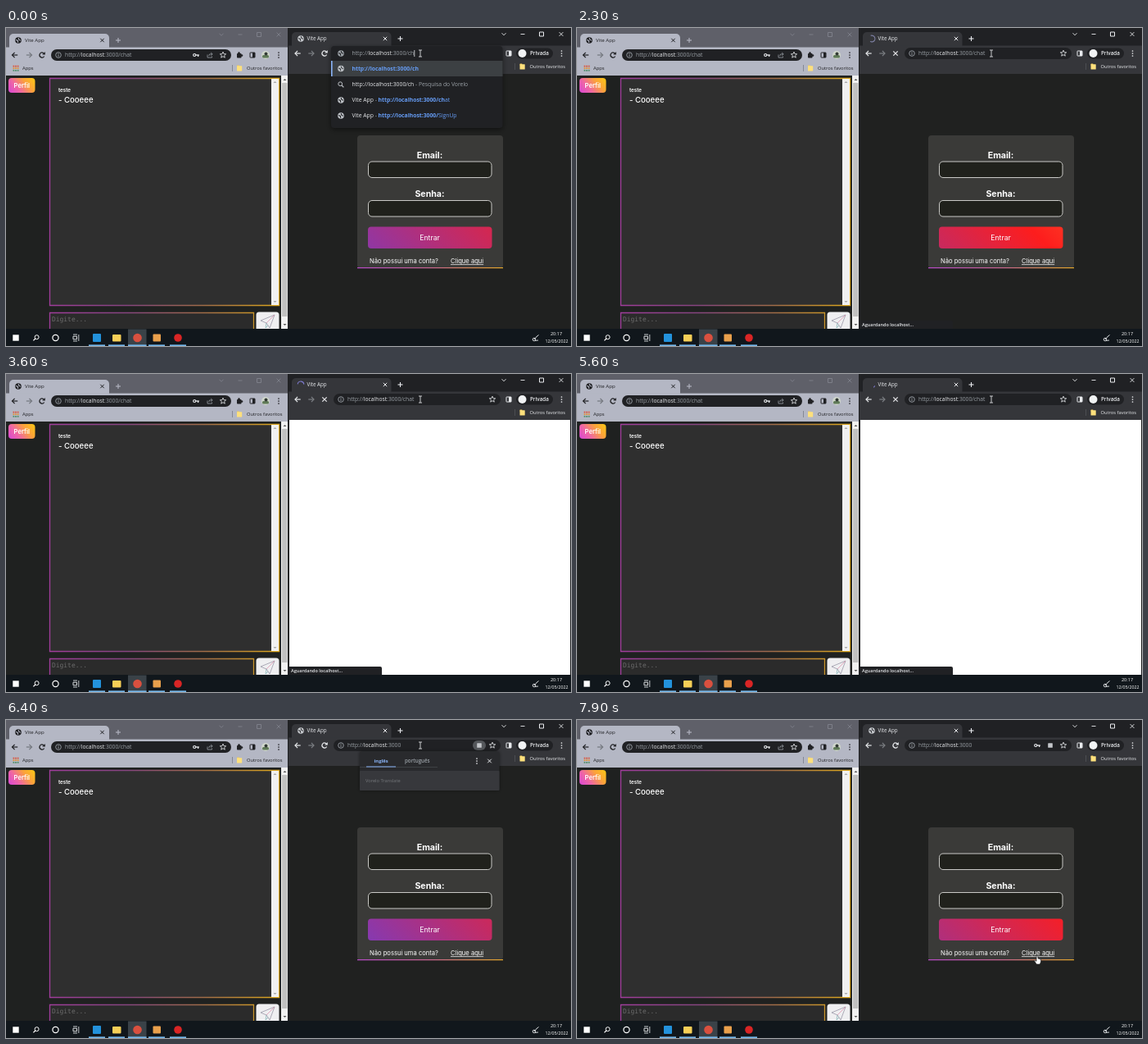
Animation, 690 px wide and 388 px high, one loop 8 s. Source, as an HTML page with a canvas:

```html
<!DOCTYPE html>
<html lang="pt">
<head>
<meta charset="utf-8">
<style>
  html, body { margin: 0; width: 100%; height: 100%; overflow: hidden; background: #202120; }
  canvas { display: block; }
</style>
</head>
<body>
<canvas id="stage" width="690" height="388"></canvas>
<script>
const g = document.getElementById('stage').getContext('2d');
const LOOP = 8000;
const UI = '"Open Sans", "Noto Sans", sans-serif';
const PAGE = 'Inter, sans-serif';
const MONO = '"DejaVu Sans Mono", monospace';
const GREY = '#9aa0a6', LIGHT = '#e8eaed', INK = '#202124', BLUE = '#669df6';

// Drawing helpers
function box(x, y, w, h, fill, r = 0, stroke, width = 1) {
  g.beginPath();
  g.roundRect(x, y, w, h, r);
  if (fill) { g.fillStyle = fill; g.fill(); }
  if (stroke) { g.strokeStyle = stroke; g.lineWidth = width; g.stroke(); }
}
function disc(x, y, r, fill) {
  g.beginPath();
  g.arc(x, y, r, 0, 7);
  g.fillStyle = fill;
  g.fill();
}
function ring(x, y, r, color, width = 1, from = 0, to = 2 * Math.PI) {
  g.beginPath();
  g.arc(x, y, r, from, to);
  g.strokeStyle = color;
  g.lineWidth = width;
  g.stroke();
}
function line(color, width, ...pts) {
  g.beginPath();
  for (let i = 0; i < pts.length; i += 2) g.lineTo(pts[i], pts[i + 1]);
  g.strokeStyle = color;
  g.lineWidth = width;
  g.stroke();
}
// Text centred vertically on y; returns the x where it ends
function text(str, x, y, size, color, weight = 400, font = UI, align = 'left') {
  g.font = `${weight} ${size}px ${font}`;
  g.textAlign = align;
  g.fillStyle = color;
  g.fillText(str, x, y + size * 0.36);
  return x + g.measureText(str).width;
}
function ramp(x0, y0, x1, y1, ...stops) {
  const grad = g.createLinearGradient(x0, y0, x1, y1);
  stops.forEach((c, i) => grad.addColorStop(i / (stops.length - 1), c));
  return grad;
}
function along(keys, t) {
  let i = 1;
  while (i < keys.length - 1 && t > keys[i][0]) i++;
  const [a, b] = [keys[i - 1], keys[i]];
  const k = Math.min(1, Math.max(0, (t - a[0]) / (b[0] - a[0])));
  return a.slice(1).map((v, j) => v + (b[j + 1] - v) * k);
}

// Icons
function cross(x, y, r, color, width = 1) {
  line(color, width, x - r, y - r, x + r, y + r);
  line(color, width, x - r, y + r, x + r, y - r);
}
function plus(x, y, color) {
  line(color, 1.1, x - 3, y, x + 3, y);
  line(color, 1.1, x, y - 3, x, y + 3);
}
function globe(x, y, color, hole) {
  disc(x, y, 3.8, color);
  line(hole, 1.1, x - 2.8, y - 0.6, x - 0.6, y + 0.4, x - 0.4, y + 2.8);
  line(hole, 1.1, x + 0.2, y - 2.8, x + 0.8, y - 0.8, x + 2.8, y + 0.4);
}
function magnifier(x, y, color) {
  ring(x + 0.6, y - 0.8, 2.5, color);
  line(color, 1.2, x - 1.2, y + 1, x - 3.6, y + 3.4);
}
function arrow(x, y, dir, color) {
  line(color, 1.2, x + 3.5 * dir, y, x - 3.2 * dir, y);
  line(color, 1.2, x + 0.4 * dir, y - 3.2, x + 3.5 * dir, y, x + 0.4 * dir, y + 3.2);
}
function reload(x, y, color) {
  ring(x, y, 3, color, 1.2, 0.5, 5.5);
  g.fillStyle = color;
  g.beginPath();
  g.moveTo(x + 3.8, y - 4);
  g.lineTo(x + 3.8, y - 0.4);
  g.lineTo(x + 0.2, y - 0.4);
  g.fill();
}
function star(x, y, color) {
  const pts = [];
  for (let i = 0; i <= 10; i++) {
    const a = i * Math.PI / 5 - Math.PI / 2, r = i % 2 ? 1.7 : 3.9;
    pts.push(x + r * Math.cos(a), y + r * Math.sin(a));
  }
  line(color, 0.8, ...pts);
}
function key(x, y, color) {
  ring(x - 1.8, y, 1.5, color, 1.2);
  line(color, 1.3, x - 0.2, y, x + 3.8, y);
  line(color, 1.2, x + 2.6, y, x + 2.6, y + 2);
}
function share(x, y, color) {
  line(color, 0.8, x - 3, y - 0.5, x - 3, y + 3, x + 2.5, y + 3, x + 2.5, y + 1.5);
  line(color, 0.8, x - 1.2, y + 1, x - 0.5, y - 1, x + 3, y - 1.2);
  line(color, 0.8, x + 1.2, y - 3, x + 3.2, y - 1.2, x + 1.2, y + 0.6);
}
function dots(x, y, color) {
  for (const d of [-3, 0, 3]) disc(x, y + d, 0.85, color);
}
function info(x, y) {
  ring(x, y, 3.3, GREY, 0.9);
  line(GREY, 1, x, y - 0.4, x, y + 1.8);
  line(GREY, 1, x, y - 1.9, x, y - 1);
}
function panel(x, y, color) {
  box(x - 3, y - 3, 6, 6, null, 0.5, color);
  box(x, y - 3, 3, 6, color);
}
function windowButtons(x, y, color) {
  line(color, 0.9, x - 2.5, y - 1.3, x, y + 1.3, x + 2.5, y - 1.3);
  line(color, 0.9, x + 20.5, y, x + 25.5, y);
  box(x + 43.5, y - 2.5, 5, 5, null, 0, color);
  cross(x + 70, y, 2.4, color, 0.9);
}
function bookmarkFolder(x, y, color) {
  box(x - 3, y - 3.5, 3, 2, '#f0c95a', 0.5);
  box(x - 3, y - 2.7, 6.2, 6.2, '#fde07c', 0.5);
  text('Outros favoritos', x + 9, y, 5.75, color);
}
function url(x, y, size, path) {
  x = text('http://', x, y, size, GREY);
  x = text('localhost', x, y, size, LIGHT);
  return text(':3000' + path, x, y, size, GREY);
}

function leftWindow() {
  const bar = '#b4b7c4';
  box(0, 0, 345, 26, '#5f6069');
  box(4, 7, 122, 22, bar, 5);
  box(0, 23.5, 345, 34.5, bar);
  globe(15, 15, INK, bar);
  text('Vite App', 23, 15, 6.1, INK);
  cross(117.5, 15, 2.2, INK);
  plus(137, 15, '#b4b7c4');
  windowButtons(263, 8, '#7d7f89');

  arrow(11, 33, -1, INK);
  arrow(28, 33, 1, '#74777f');
  reload(44, 33, INK);
  box(55, 26, 220, 14, INK, 7);
  info(64, 33);
  url(72, 33, 6.75, '/chat');
  key(232, 33, LIGHT);
  share(249, 33, GREY);
  star(265, 33, LIGHT);
  box(282, 31, 5.5, 5.5, INK, 0.8);
  disc(284.5, 30.5, 1.3, INK);
  disc(288, 33.5, 1.3, INK);
  panel(301, 33, INK);
  disc(317, 33, 5, '#cfd6cb');
  box(313, 33, 8, 3.5, '#5f7a57', 1.5);
  disc(317.5, 31.5, 2, '#343c36');
  dots(333, 33, INK);
  ['#d9553f', '#e2923a', '#4f8f6a'].forEach((c, i) => {
    for (let j = 0; j < 3; j++) box(8.5 + j * 2.6, 45.7 + i * 2.6, 1.8, 1.8, c);
  });
  text('Apps', 20, 49, 5.8, INK);
  line('#858894', 1, 276.5, 45, 276.5, 53);
  bookmarkFolder(285, 49, INK);

  // Chat page
  const edge = ramp(53, 0, 334, 0, '#a13d9c', '#864580', '#a06c48', '#dfa91c');
  box(0, 58, 344, 309, '#1f2120');
  box(3, 61, 32.5, 18, ramp(5, 82, 34, 59, '#d846d8', '#ef66a5', '#fba23a', '#fcc912'), 4);
  text('Perfil', 19.3, 70, 7.6, '#fff', 600, PAGE, 'center');
  box(53.5, 61.5, 280, 277, '#2f2f2f', 0, edge, 1.3);
  box(324, 62, 9, 276, '#f1f1f1');
  scrollTips(328.5, 66, 334, '#a5a5a5');
  text('teste', 64, 76, 6.2, '#fff', 600, PAGE);
  text('- Cooeee', 64, 87.5, 9.6, '#fff', 500, PAGE);
  box(53.5, 347.5, 249, 24, '#2b2b2b', 0, edge, 1.3);
  text('Digite...', 56, 355, 7.95, '#6c6c6c', 400, MONO);
  box(305.5, 346.5, 28, 24, '#efeff1', 3.5);
  line('#8d8a9c', 0.7, 311, 357, 328, 350, 322, 366, 318, 360, 311, 357);
  line('#dd8aa6', 0.7, 318, 360, 328, 350);
  line('#7fb0b4', 0.7, 318, 360, 317, 366, 320, 363);
  box(336, 58, 8, 309, '#f1f1f1');
  box(337, 67, 6.5, 285, '#c1c1c1');
  scrollTips(340.5, 63, 362, '#555');
}
function scrollTips(x, top, bottom, color) {
  g.fillStyle = color;
  for (const [y, d] of [[top, -1], [bottom, 1]]) {
    g.beginPath();
    g.moveTo(x - 2, y - d);
    g.lineTo(x + 2, y - d);
    g.lineTo(x, y + d);
    g.fill();
  }
}

// Position of the sliding button gradient, as a share of its full length
function shift(t) {
  const s = t / 1000;
  return t < 3000 ? 0.05 + 0.075 * s + 0.011 * s * s : 0.01 + 0.113 * (s - 6.4);
}
function loginForm(t) {
  box(429, 131, 178, 162, '#3a3a38', 4);
  box(429, 292, 178, 1.2, ramp(429, 0, 607, 0, '#b54bc4', '#c5648f', '#e0a52b'));
  const fields = [['Email:', 155], ['Senha:', 202.5]];
  for (const [label, y] of fields) {
    text(label, 517.5, y, 10.6, '#fff', 700, PAGE, 'center');
    box(442.5, y + 8, 150.5, 19.5, '#20211c', 4.5, '#c9c9c6');
  }
  const len = 620, x = 442 - shift(t) * len;
  // The gradient line is tilted 45 degrees, so its span is halved on each axis
  const fill = ramp(x, 269, x + len / 2, 269 - len / 2, '#833ab4', '#fd1d1d', '#fcb045');
  box(442, 242.5, 151.5, 26.5, fill, 4);
  text('Entrar', 517.5, 256, 8.7, '#fff', 400, PAGE, 'center');
  text('Não possui uma conta?', 444, 284.5, 7.6, '#fff', 400, PAGE);
  const end = text('Clique aqui', 543, 284.5, 7.6, '#fff', 400, PAGE);
  line('#fff', 0.7, 543, 288.6, end, 288.6);
}

function suggestions(t) {
  const typed = t < 300 ? '/ch' : t < 600 ? '/cha' : '/chat';
  const first = t < 300;
  const rowY = [49.5, 69, 88, 107];
  g.save();
  g.shadowColor = 'rgba(0,0,0,.5)';
  g.shadowBlur = 6;
  g.shadowOffsetY = 2;
  box(397, 22, 209.5, first ? 100 : 60, INK, 4);
  g.restore();
  globe(409, 31, GREY, INK);
  const end = url(422.5, 31, 6.8, typed);
  if (t % 1000 < 500) line(LIGHT, 0.8, end + 0.6, 27, end + 0.6, 35);
  box(397, 40, 209.5, 19, '#3c4043');
  box(397, 40, 1.6, 19, '#8ab4f8');

  const visited = (y, bold, rest) => {
    globe(409, y, '#bdc1c6', INK);
    let x = text('Vite App', 422.5, y, 6.8, LIGHT);
    x = text(' - ', x, y, 6.8, GREY);
    x = text('http://localhost:3000' + bold, x, y, 6.8, BLUE, 700);
    text(rest, x, y, 6.8, BLUE);
  };
  if (first) {
    globe(409, rowY[0], '#bdc1c6', '#3c4043');
    text('http://localhost:3000/ch', 422.5, rowY[0], 6.8, BLUE, 700);
    visited(rowY[2], '/ch', 'at');
    visited(rowY[3], '/', 'SignUp');
  } else {
    visited(rowY[0], typed, '/chat'.slice(typed.length));
    cross(596, rowY[0], 2.3, LIGHT);
  }
  ring(408.2, rowY[1] - 0.8, 2.4, '#bdc1c6');
  line('#bdc1c6', 1.2, 410, rowY[1] + 1, 412.4, rowY[1] + 3.4);
  const x = text('http://localhost:3000' + typed, 422.5, rowY[1], 6.8, LIGHT);
  text(' - Pesquisa do Vorelo', x, rowY[1], 6.8, GREY);
}

function translatePopup() {
  g.save();
  g.shadowColor = 'rgba(0,0,0,.45)';
  g.shadowBlur = 4;
  box(432, 38.5, 170.5, 47.5, '#292a2d', 2);
  g.restore();
  box(432, 62, 170.5, 24, '#37383c', 1);
  text('inglês', 449.5, 50, 5.9, '#8ab4f8', 700);
  text('português', 487, 50, 6.2, GREY, 600);
  line('#45474b', 0.8, 432, 57.5, 527, 57.5);
  line('#8ab4f8', 1.2, 440, 57, 476, 57);
  dots(575, 50, LIGHT);
  cross(590.5, 50, 2.3, LIGHT);
  text('Vorelo Translate', 439, 74, 5.7, '#74777b');
}

function spinner(t) {
  const [start, sweep] = along([[1700, 0, 280], [2300, -110, 230], [3600, -530, 165], [5600, -700, 35], [6000, -790, 60]], t);
  const rad = Math.PI / 180;
  ring(360, 13, 3.9, t < 2500 ? '#8083a8' : '#7e7bd0', 1.1, start * rad, (start + sweep) * rad);
}

function rightWindow(t) {
  const loading = t >= 1700 && t < 6000;
  const bar = '#35363a';
  box(344, 0, 346, 367, INK);
  box(349, 5, 121.5, 22, bar, 5);
  box(345, 21.5, 345, 34.5, bar);
  if (loading) spinner(t);
  else globe(360, 13, '#c4c7cb', bar);
  text('Vite App', 367.5, 13, 6.2, LIGHT);
  cross(463, 13, 2.2, LIGHT);
  plus(481.5, 13, LIGHT);
  windowButtons(608, 7.5, LIGHT);
  arrow(356.5, 31, -1, LIGHT);
  arrow(372.5, 31, 1, '#7c7f84');
  if (loading) cross(389, 31, 2.7, LIGHT, 1.2);
  else reload(389, 31, LIGHT);
  box(400, 24, 204, 14, INK, 7);
  panel(614, 31, LIGHT);
  box(623, 24.5, 45, 13, INK, 6.5);
  disc(630.5, 31, 5, '#f1f3f4');
  text('Privada', 640, 31, 6.3, LIGHT, 600);
  dots(678.5, 31, LIGHT);
  line('#4c4e52', 1, 621.5, 43, 621.5, 51);
  bookmarkFolder(630.5, 47, LIGHT);

  const blank = t >= 2500 && t < 5800;
  box(346, 56, 343, 311, blank ? '#fff' : '#202120');
  if (t < 2500 || t >= 6400) loginForm(t);
  if (t >= 1800 && t < 6200) {
    box(345, 357, 114, 10, INK, [0, 2, 0, 0]);
    text('Aguardando localhost...', 348, 362, 5.55, LIGHT, 600);
  }

  if (t < 1700) return suggestions(t);
  info(409, 31);
  url(417, 31, 6.75, t < 6000 ? '/chat' : '');
  star(594, 31, LIGHT);
  if (t >= 6000) {
    if (t < 7300) box(570, 25, 16, 12, '#54575b', 6);
    box(575.2, 28.2, 5.6, 5.6, '#c3c6ca', 0.6);
    if (t < 7300) translatePopup();
    else key(562, 31, LIGHT);
  }
}

function taskbar() {
  const y = 378;
  box(0, 367, 690, 21, '#11171c');
  box(149, 367.5, 22.5, 20.5, '#3a4248');
  box(8.3, y - 3.7, 7.4, 7.4, '#fff');
  magnifier(37, y, '#fff');
  ring(60.5, y, 3.6, '#fff', 1.2);
  box(82, y - 1.8, 4.5, 3.6, null, 0, '#dcdfe1');
  line('#dcdfe1', 0.9, 82, 374, 87, 374);
  line('#dcdfe1', 0.9, 82, 382, 87, 382);
  line('#dcdfe1', 0.9, 88.8, 374, 88.8, 382);
  box(106, y - 5, 10, 10, '#2392dc', 1);
  box(130, y - 4, 10.5, 8.5, '#f7cf57', 1);
  disc(160.5, y, 5.3, '#d9503f');
  box(179.5, y - 4.5, 9.5, 9, '#e9a04c', 1);
  disc(210, y, 4.8, '#d92525');
  for (const x of [101, 125, 149, 174, 200]) box(x, 386.4, x === 149 ? 22.5 : 20, 1.6, '#76b9ed');
  line('#e6e8ea', 1, 645, 380, 647, 377.5, 650.5, 374.5);
  ring(645, 380, 1.8, '#e6e8ea', 0.9);
  line('#e6e8ea', 0.9, 646, 381.5, 650, 381);
  text('20:17', 672, 373, 5.5, '#fff', 400, UI, 'center');
  text('12/05/2022', 672.5, 382, 5.3, '#fff', 400, UI, 'center');
}

function polygon(x, y, pts) {
  g.beginPath();
  for (let i = 0; i < pts.length; i += 2) g.lineTo(x + pts[i], y + pts[i + 1]);
  g.closePath();
  g.fillStyle = '#fff';
  g.fill();
  g.strokeStyle = '#111';
  g.lineWidth = 0.6;
  g.stroke();
}
function pointer(t) {
  const [x, y] = along([[6400, 506, 31], [6600, 575, 50], [6900, 651, 58], [7100, 636, 140],
    [7300, 594, 225], [7500, 572, 276], [7900, 562, 287.5]], t);
  if (t < 6600) {
    line('#d8dadd', 0.9, x, y - 4, x, y + 4);
    for (const d of [-4, 4]) line('#d8dadd', 0.9, x - 2, y + d, x + 2, y + d);
  } else if (t < 7600) {
    polygon(x, y, [0, 0, 0, 9.5, 2.2, 7.5, 3.7, 11, 5.1, 10.4, 3.7, 7, 6.7, 7]);
  } else {
    polygon(x, y, [-0.8, 0, 0.8, 0, 1, 3.5, 4.5, 4.6, 4.5, 7.5, 3.3, 10.5, -0.8, 10.5, -3.5, 6.3, -2.8, 5.5, -1, 6.8]);
  }
}

function frame(now) {
  const t = Math.floor(now % LOOP / 100) * 100;
  g.clearRect(0, 0, 690, 388);
  leftWindow();
  rightWindow(t);
  taskbar();
  pointer(t);
  requestAnimationFrame(frame);
}
requestAnimationFrame(frame);
</script>
</body>
</html>
```
